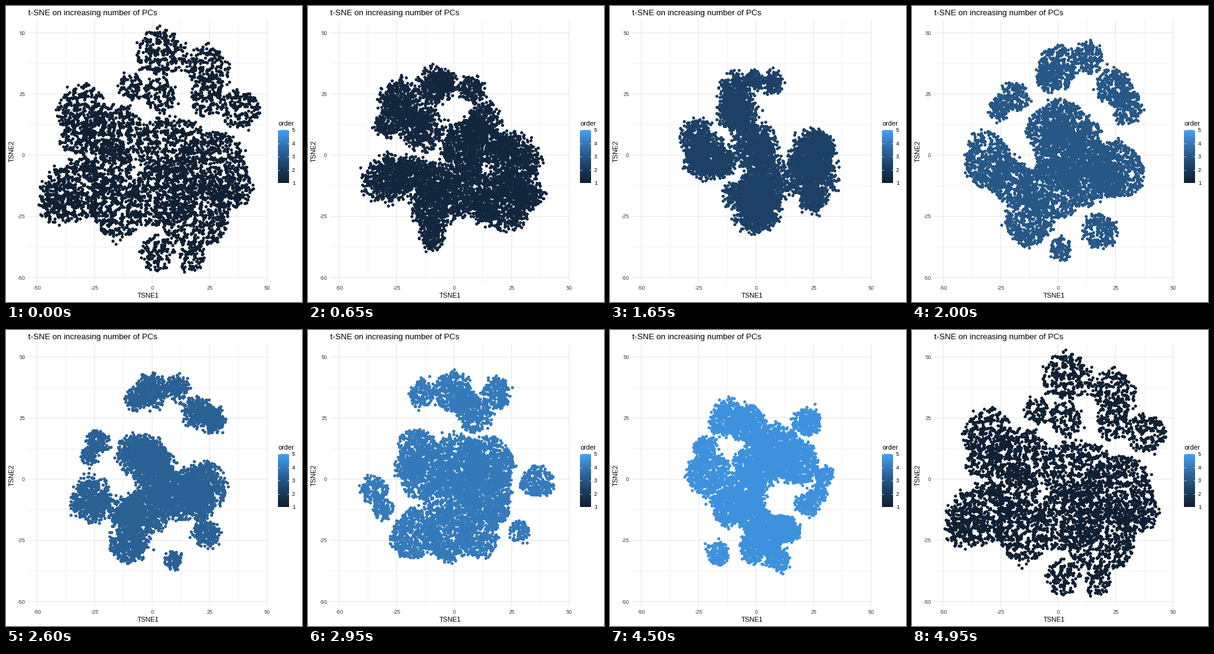
Recreate the animation shown at these times as a matplotlib script. Size 480 by 480 pixels, loop 5000 ms.

```python
import numpy as np
import matplotlib.pyplot as plt
from matplotlib.animation import FuncAnimation

SIZE, DPI = 480, 80
PT = 72 / DPI                       # points per pixel
FRAMES, INTERVAL = 100, 50
STARTS = [10, 30, 49, 69, 89]       # last still frame before each move
STEPS = 10
DENSITY = 1.15                      # cells per square unit in the first state
SPREAD = [1, .87, .84, .79, .72]    # the cloud tightens from state to state

rng = np.random.default_rng(7)
plt.rcParams["font.family"] = "Liberation Sans"


# ---- colour scale: Lab ramp shown with display gamma 1.8 ----
RGB2XYZ = np.array([[.4124, .3576, .1805], [.2126, .7152, .0722], [.0193, .1192, .9505]])
WHITE = RGB2XYZ.sum(axis=1)
LAB = np.array([[0, 116, 0], [500, -500, 0], [0, 200, -200]])


def to_lab(rgb):
    c = np.array(rgb) / 255
    lin = np.where(c > .04045, ((c + .055) / 1.055) ** 2.4, c / 12.92)
    t = RGB2XYZ @ lin / WHITE
    return LAB @ np.where(t > .008856, np.cbrt(t), 7.787 * t + 16 / 116)


LOW, HIGH = to_lab((19, 43, 67)), to_lab((86, 177, 247))


def ramp(level):
    t = np.linalg.solve(LAB, LOW + (HIGH - LOW) * (level - 1) / 4)
    xyz = np.where(t > .2069, t ** 3, (t - 16 / 116) / 7.787) * WHITE
    return np.clip(np.linalg.solve(RGB2XYZ, xyz), 0, 1) ** (1 / 1.8)


# ---- cell clusters: wavy discs that travel between five centres ----
def disc(n, r):
    a = rng.uniform(0, 2 * np.pi, n)
    p, q = rng.uniform(0, 2 * np.pi, 2)
    edge = 1 + .07 * np.sin(2 * a + p) + .06 * np.sin(3 * a + q)
    rad = r * edge * np.sqrt(rng.random(n))
    stray = np.clip(rng.standard_t(2.5, (n, 2)) * .3, -2.5, 2.5)
    return np.column_stack([rad * np.cos(a), rad * np.sin(a)]) + stray


def ripple(p, amp):
    """Bunch the cells into small strands with gaps between."""
    x, y = p.T
    return p + amp * np.column_stack([np.sin(1.6 * x + 1.3 * np.sin(.8 * y)),
                                      np.sin(1.7 * y + 1.3 * np.sin(.9 * x))])


clusters = []


def cluster(r, *centres):
    n = round(DENSITY * np.pi * r * r)
    clusters.append([c + disc(n, r * s) for c, s in zip(centres, SPREAD)])


# islands
cluster(8.5, (-41, -19), (30, 20), (18, -31), (36, -1), (29, 28))
cluster(5.5, (17, -42), (4, 20), (1, -38), (28, -21), (31, 6))
cluster(7, (3, 25), (18, 32), (-19, 24), (-35, -4), (24, -14))
cluster(5.5, (-9, 28), (9, 36), (-26, 19), (-31, -12), (31, -9))
cluster(10, (4, 42), (-37, -4), (0, 36), (-1, 36), (-1, -35))
cluster(9, (24, 36), (-14, -33), (24, 28), (9, 26), (9, -26))
cluster(7.5, (24, 24), (-26, -21), (13, 40), (5, 31), (4, -31))
cluster(8, (38, 19), (-25, -32), (30, 20), (18, 35), (6, -38))
cluster(7, (2, -40), (-36, -18), (-4, 32), (-14, 35), (-19, -29))
# lower lobe
cluster(13, (-34, -14), (-17, 0), (-30, -2), (-17, -22), (-20, 4))
cluster(12, (-16, -21), (5, -22), (-13, -27), (-3, -24), (-11, -10))
cluster(11, (-20, -4), (13, -26), (-20, -11), (11, -23), (2, -18))
# upper left
cluster(11, (-30, 18), (-11, 33), (-5, 10), (-16, 12), (-11, 26))
cluster(12, (-16, 9), (-13, 19), (3, 13), (-14, 2), (-2, 24))
cluster(7, (-33, 8), (-20, 24), (13, 8), (-20, 5), (-21, 14))
# main body
cluster(14, (8, 3), (-2, 5), (2, 0), (2, 7), (-1, 6))
cluster(14, (27, -4), (24, 2), (25, -6), (15, 6), (16, 8))
cluster(14, (4, -16), (8, -9), (-3, -14), (-1, -8), (-6, -4))
cluster(15, (19, -23), (28, -9), (12, -7), (13, -4), (7, 16))
cluster(8, (35, -14), (26, -22), (22, -10), (18, -12), (11, -21))

states = [np.concatenate(s) for s in zip(*clusters)]
states = [ripple(s, .5 / (n + 1)) for n, s in enumerate(states)]
states.append(states[0])
levels = [1, 2, 3, 4, 5, 1]


# ---- chart ----
fig = plt.figure(figsize=(SIZE / DPI, SIZE / DPI), dpi=DPI, facecolor="white")
ax = fig.add_axes([0, 0, 1, 1])
ax.set_axis_off()

LEFT, RIGHT, TOP, BOTTOM = 35.7, 424.7, 23.2, 448.5
GRID, TICK = "#e6e6e6", "#3d3d3d"


def px(v):
    return 237 + 3.73 * v


def py(v):
    return 242 - 3.97 * v


def text(x, y, s, size, **kw):
    ax.text(x, y, s, fontsize=size * PT, **kw)


for v in np.arange(-50, 51, 12.5):
    major = v % 25 == 0
    style = dict(color=GRID, lw=(1.07 if major else .53) * PT, zorder=1,
                 solid_capstyle="butt", snap=False)
    ax.plot([px(v)] * 2, [TOP, BOTTOM], **style)
    ax.plot([LEFT, RIGHT], [py(v)] * 2, **style)
    if major:
        text(px(v), 460, f"{v:.0f}", 8.8, ha="center", color=TICK)
        text(31, py(v) + 3.2, f"{v:.0f}", 8.8, ha="right", color=TICK)

text(36, 15, "t-SNE on increasing number of PCs", 13.2)
text(230, 473, "TSNE1", 11, ha="center")
text(15, 235, "TSNE2", 11, rotation=90, ha="right", va="center")

# colour bar
X0, X1, Y0, Y1 = 441, 459, 201, 287
text(441, 194, "order", 11)
bar = np.array([[ramp(v)] for v in np.linspace(5, 1, Y1 - Y0)])
ax.imshow(bar, extent=(X0, X1, Y1, Y0), aspect="auto", interpolation="nearest", zorder=2)
for v in range(1, 6):
    y = Y1 - (Y1 - Y0) * (v - 1) / 4
    for a, b in ((X0, X0 + 3.4), (X1 - 3.4, X1)):
        ax.plot([a, b], [y, y], color="white", lw=.7 * PT, zorder=3, solid_capstyle="butt")
    text(464, y + 3.2, str(v), 8.8)

dots, = ax.plot([], [], "o", ms=5 * PT, mew=0, zorder=4)
ax.set_xlim(0, SIZE)
ax.set_ylim(SIZE, 0)


def draw(frame):
    pos, level = states[0], levels[0]
    for n, start in enumerate(STARTS):
        u = np.clip((frame - start) / STEPS, 0, 1)
        pos = pos + u * (states[n + 1] - states[n])
        level = level + u * (levels[n + 1] - levels[n])
    dots.set_data(px(pos[:, 0]), py(pos[:, 1]))
    dots.set_color(ramp(level))
    return dots,


anim = FuncAnimation(fig, draw, frames=FRAMES, interval=INTERVAL, repeat=True, repeat_delay=0)
plt.show()
```
